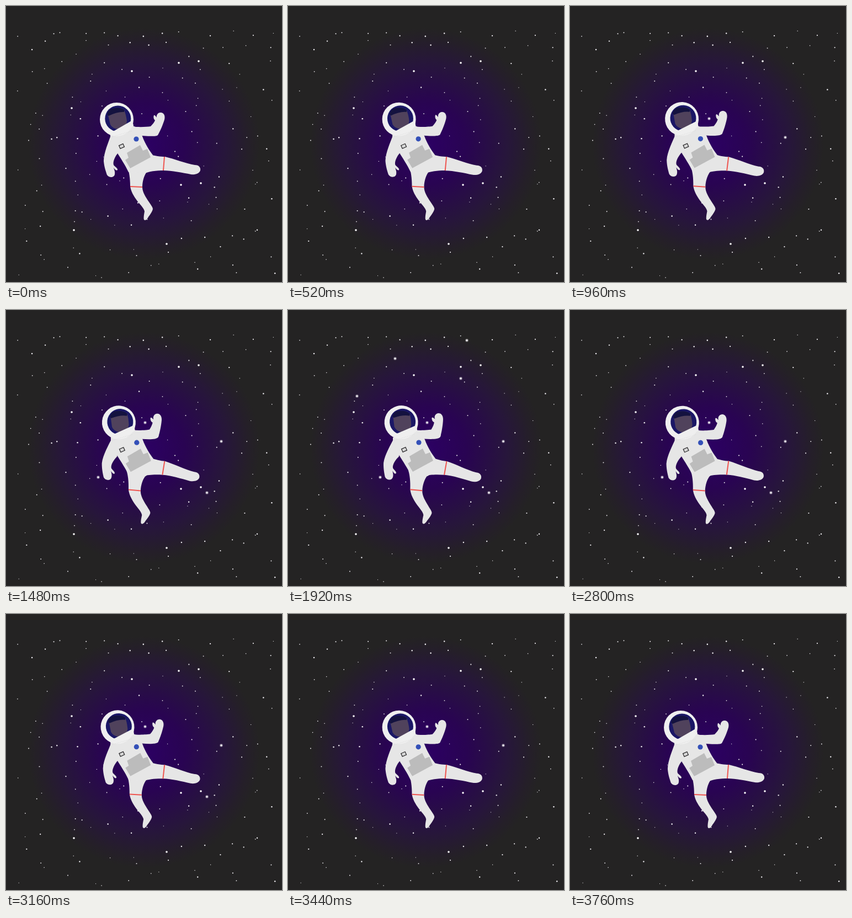
These frames come from a looping animation (500x500 px, 3.84 s). An HTML page with a canvas:

```html
<!DOCTYPE html>
<html lang="en">
<head>
<meta charset="utf-8">
<title>Floating astronaut</title>
<style>
  html, body { margin: 0; width: 100%; height: 100%; overflow: hidden; background: #242323; }
  canvas { display: block; width: 500px; height: 500px; }
</style>
</head>
<body>
<canvas id="stage" width="500" height="500"></canvas>
<script>
const LOOP = 3840, STEP = 40;
const ctx = document.getElementById('stage').getContext('2d');

const SUIT = '#e6e6e6', BAND = '#ee5550';

// The few brightest stars anchor the sky
const brightStars = [
  [119, 185], [228, 118], [313, 103], [349, 100],
  [123, 406], [291, 431], [317, 324], [353, 321]
];

// x, y and the time each glow switches on; they go out in reverse order
const GLOW_SPAN = 4400;
const glowStars = [
  [252, 204, 720], [390, 238, 860], [364, 331, 1120], [167, 303, 1340],
  [324, 55, 1680], [125, 156, 1680], [194, 88, 1680], [313, 124, 1920]
];

const shape = d => new Path2D(d);
const torso = shape('M189 232C188 241 196 257 201 265C207 275 216 288 222 301L252 302L264 292L266 270C260 262 252 250 247 236L240 222L230 217Z');
const leftArm = shape('M190 234C186 246 177 266 177 281C178 292 181 300 183 306C187 312 196 311 197 305C198 300 196 297 195 293C197 296 200 299 202 297C203 294 197 291 195 288C193 282 198 272 203 266L206 244Z');
const upperArm = shape('M228 218C240 220 255 219 262 218C270 218 278 225 275 232C272 237 258 236 246 235L240 240L226 235Z');
const forearm = shape('M262 218C266 214 269 210 270 207C267 205 267 200 268 198C270 197 271 200 273 202C272 198 275 193 280 193C286 193 289 199 287 206C284 216 279 227 275 234C271 237 262 236 258 230Z');
const rightLeg = shape('M258 268C270 272 280 273 288 273C305 277 325 285 342 288C350 288 353 293 352 298C350 304 342 306 335 305C320 302 300 298 286 298C272 298 258 300 252 303C245 307 240 300 240 290Z');
const leftLeg = shape('M220 292C223 300 225 312 225 326C226 336 232 345 237 352C243 360 250 366 251 372C250 378 249 384 250 387C252 390 256 386 258 382C262 377 265 372 266 368C266 364 262 360 259 355C253 346 247 337 247 328C247 318 250 308 254 302L262 290Z');
const panel = shape('M219 266L243 252L248 262L256 259L262 274L225 294L216 279L222 275Z');
const head = shape('M184 194L213 187Q217 194 219 208L218 214L203 223Q193 222 189 215Z');
const hair = shape('M183 197Q185 188 191 186Q205 182 214 188L214 192Q202 191 186 199Z');
const collar = shape('M191 229L229 207L231 217L214 232L196 234Z');

function seededRandom(seed) {
  return () => (seed = seed * 16807 % 2147483647) / 2147483647;
}

// One star somewhere inside each cell of a loose grid
function scatterStars() {
  const random = seededRandom(4127), cell = 36, found = [];
  for (let y = 24; y < 460; y += cell) {
    for (let x = 20; x < 480; x += cell) {
      found.push({
        x: x + random() * cell,
        y: y + random() * cell,
        r: 0.6 + 0.7 * random()
      });
    }
  }
  return found;
}
const smallStars = scatterStars();

function fill(path, color) {
  ctx.fillStyle = color;
  ctx.fill(path);
}

function disc(x, y, r, color) {
  ctx.fillStyle = color;
  ctx.beginPath();
  ctx.arc(x, y, r, 0, Math.PI * 2);
  ctx.fill();
}

function line(x1, y1, x2, y2, color, width) {
  ctx.strokeStyle = color;
  ctx.lineWidth = width;
  ctx.beginPath();
  ctx.moveTo(x1, y1);
  ctx.lineTo(x2, y2);
  ctx.stroke();
}

// Draws a part turned clockwise about a joint
function joint(x, y, degrees, draw) {
  ctx.save();
  ctx.translate(x, y);
  ctx.rotate(degrees * Math.PI / 180);
  ctx.translate(-x, -y);
  draw();
  ctx.restore();
}

function drawSky(time) {
  const glow = ctx.createRadialGradient(250, 250, 0, 250, 250, 210);
  glow.addColorStop(0, '#2c0064');
  glow.addColorStop(0.35, '#290452');
  glow.addColorStop(0.7, '#27163b');
  glow.addColorStop(0.9, '#251f29');
  glow.addColorStop(1, '#242323');
  ctx.fillStyle = glow;
  ctx.fillRect(0, 0, 500, 500);

  for (const { x, y, r } of smallStars) disc(x, y, r, '#eceaee');
  for (const [x, y] of brightStars) disc(x, y, 1.8, '#fff');
  for (const [x, y, on] of glowStars) {
    if (time < on || time > GLOW_SPAN - on) continue;
    disc(x, y, 3, 'rgba(255,255,255,.3)');
    disc(x, y, 1.8, '#f4f2f6');
  }
}

function drawHelmet() {
  disc(200.5, 205.5, 30.5, '#efefef');
  disc(202.8, 204, 23.5, '#1b1766');
  fill(head, '#50425c');
  fill(hair, '#14123f');
  fill(collar, '#efefef');
}

function drawChest() {
  fill(torso, SUIT);
  fill(panel, '#bcbcbc');
  disc(236, 241, 4.6, '#3450b8');
  joint(209.5, 254, -24, () => {
    ctx.fillStyle = '#d8d8d8';
    ctx.strokeStyle = '#302f31';
    ctx.lineWidth = 1.3;
    ctx.fillRect(205.5, 251, 8, 6);
    ctx.strokeRect(205.5, 251, 8, 6);
  });
}

// sway runs from 0 (rest) to 1 (fully tilted)
function drawAstronaut(sway) {
  ctx.save();
  ctx.translate(sway, -sway);
  joint(265, 268, 5.5 * sway, () => {
    fill(rightLeg, SUIT);
    line(287, 273, 285, 298, BAND, 2);
  });
  joint(238, 220, 2.5 * sway, () => {
    fill(leftLeg, SUIT);
    line(225, 327, 247, 328, BAND, 2);
  });
  joint(198, 242, 7.5 * sway, () => fill(leftArm, SUIT));
  joint(235, 228, -2 * sway, () => {
    fill(upperArm, SUIT);
    joint(260, 231, -12.5 * sway, () => fill(forearm, SUIT));
  });
  drawChest();
  joint(210, 235, 7 * sway, drawHelmet);
  ctx.setLineDash([1, 2]);
  line(192, 237, 229, 226, '#d0d0d0', 0.8);
  ctx.setLineDash([]);
  ctx.restore();
}

function render(now) {
  const time = Math.floor((now % LOOP) / STEP) * STEP;
  const sway = (1 - Math.cos(2 * Math.PI * (time - 60) / LOOP)) / 2;
  drawSky(time);
  drawAstronaut(sway);
  requestAnimationFrame(render);
}

render(0);
</script>
</body>
</html>
```
